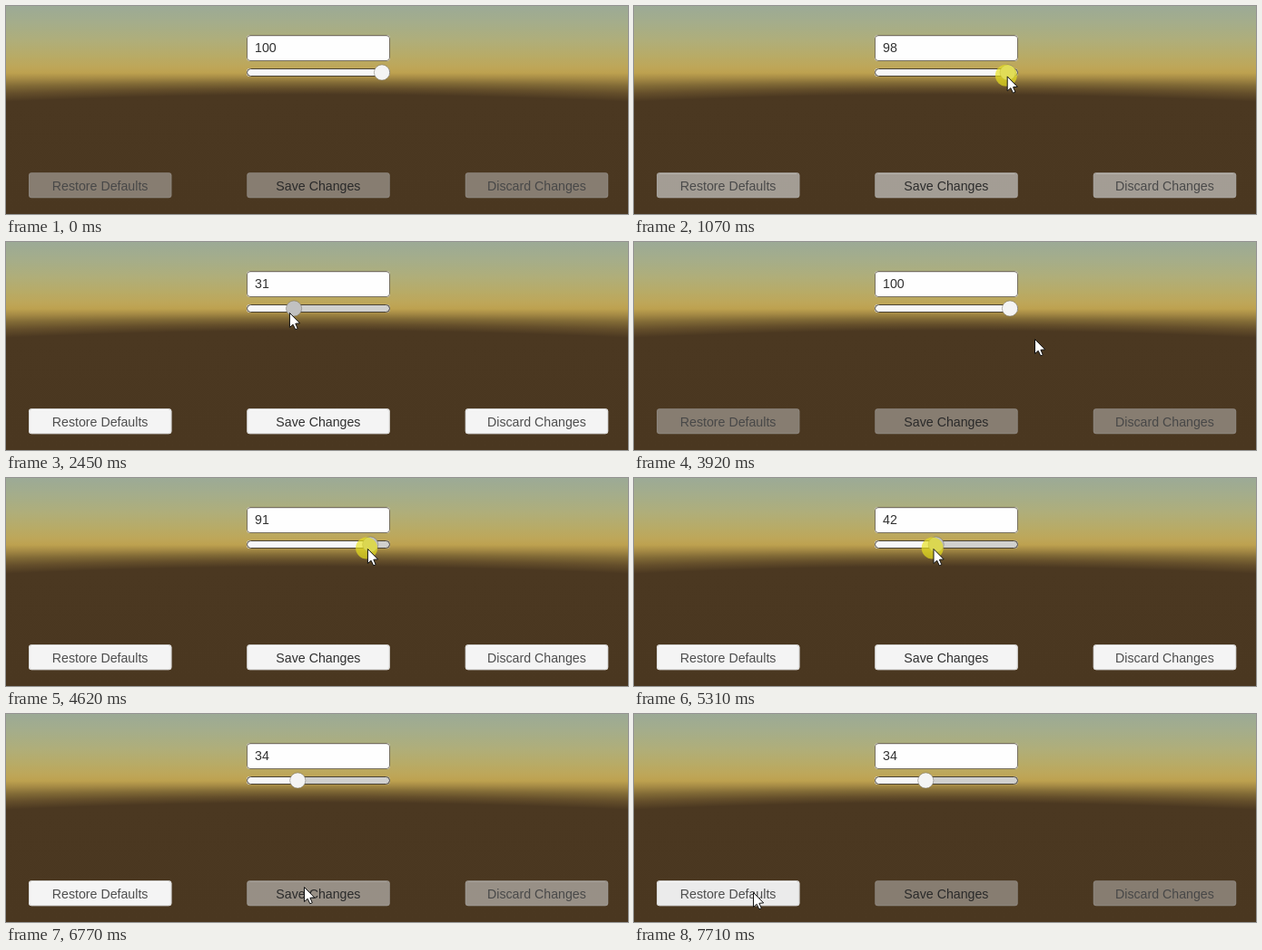
Animation, 685 px wide and 230 px high, one loop 8000 ms. Source, as an HTML page with a canvas:

```html
<!DOCTYPE html>
<html lang="en">
<head>
<meta charset="utf-8">
<title>Settings slider</title>
<style>
html, body { margin: 0; width: 100%; height: 100%; overflow: hidden; background: #4b3822; }
canvas { display: block; }
</style>
</head>
<body>
<canvas id="stage" width="685" height="230"></canvas>
<script>
const W = 685, H = 230, LOOP = 8000;
const ctx = document.getElementById('stage').getContext('2d');
const FONT = '14.2px "Liberation Sans", Arial, sans-serif';

const linear = p => p;
const easeOut = p => 1 - (1 - p) ** 3;
const easeInOut = p => p * p * (3 - 2 * p);
const mix = (a, b, p) => a + (b - a) * p;
const between = (t, a, b) => t >= a && t < b;

// Each move: start, end, from, to, easing, vertical bend.
const MOVES = [
  [250, 670, [564, 226], [401, 77], easeOut],
  [830, 900, [401, 77], [414, 77], linear],
  [1010, 1450, [414, 77], [390, 80], linear],
  [1450, 2400, [390, 80], [310, 77], linear],
  [2450, 2830, [310, 77], [554, 196], easeOut],
  [3540, 3920, [554, 196], [441, 107], easeOut],
  [4010, 4300, [441, 107], [410, 78], easeOut],
  [4410, 4620, [410, 78], [398, 78], linear],
  [4620, 5240, [398, 78], [335, 78], linear],
  [5240, 5820, [335, 78], [318, 78], easeOut],
  [5840, 6390, [318, 78], [328, 191], easeOut],
  [7100, 7710, [328, 191], [131, 197], easeInOut, -8]
];

// Same shape as MOVES, with the slider value instead of a point.
const VALUES = [
  [1010, 1450, 100, 88, linear],
  [1450, 2400, 88, 31, linear],
  [3450, 3451, 31, 100, linear],
  [4410, 4620, 100, 91, linear],
  [4620, 5240, 91, 46, linear],
  [5240, 5820, 46, 34, easeOut]
];

const DRAGS = [[1040, 2420], [4440, 5840]];
const CLICKS = [[3380, 3450], [6620, 6690]];
const inAny = (t, spans) => spans.some(([a, b]) => between(t, a, b));

const BUTTONS = [
  { x: 25, label: 'Restore Defaults', ink: 78, on: [[1040, 3450], [4440, LOOP]] },
  { x: 265.3, label: 'Save Changes', ink: 48, on: [[1040, 3450], [4440, 6690]] },
  { x: 505.8, label: 'Discard Changes', ink: 78, on: [[1040, 3450], [4440, 6690]] }
];

function current(list, t) {
  let found = list[0];
  for (const item of list) if (t >= item[0]) found = item;
  const p = Math.min(1, Math.max(0, (t - found[0]) / (found[1] - found[0])));
  return [found, found[4](p), p];
}

function pointer(t) {
  const [[, , a, b, , bend = 0], e, p] = current(MOVES, t);
  return [mix(a[0], b[0], e), mix(a[1], b[1], e) + bend * Math.sin(Math.PI * p)];
}

function sliderValue(t) {
  const [[, , a, b], e] = current(VALUES, t);
  return mix(a, b, e);
}

// Strength from 0 to 1 with a short fade at both ends of each span.
function fade(t, spans, time = 100) {
  return Math.max(...spans.map(([a, b]) => {
    const rise = Math.min(1, Math.max(0, (t - a) / time));
    const fall = b >= LOOP ? 0 : Math.min(1, Math.max(0, (t - b) / time));
    return rise - fall;
  }));
}

const grey = (v, alpha = 1) => `rgba(${v},${v},${v},${alpha})`;

function makeBackdrop() {
  const layer = document.createElement('canvas');
  layer.width = W;
  layer.height = H;
  const c = layer.getContext('2d');
  const stops = [
    [0, '#9caa96'], [18, '#a4ad8b'], [38, '#afae7a'], [55, '#b8ab67'],
    [68, '#bea658'], [74, '#bda14f'], [79, '#a58a45'], [85, '#816a36'],
    [91, '#654f2b'], [98, '#4b3821']
  ];
  for (let x = 0; x < W; x++) {
    const sag = 8 * ((x - W / 2) / (W / 2)) ** 2;
    const g = c.createLinearGradient(0, 0, 0, H);
    for (const [y, color] of stops) {
      const drop = sag * Math.max(0, (y - 74) / 24);
      g.addColorStop((y + drop) / H, color);
    }
    g.addColorStop(1, '#4a3720');
    c.fillStyle = g;
    c.fillRect(x, 0, 1, H);
  }
  return layer;
}

function box(x, y, w, h, r) {
  ctx.beginPath();
  ctx.roundRect(x, y, w, h, r);
}

function text(label, x, y, color, align) {
  ctx.font = FONT;
  ctx.textAlign = align;
  ctx.fillStyle = color;
  ctx.fillText(label, x, y);
}

function drawField(value) {
  box(265, 32, 158, 29, 4);
  ctx.fillStyle = '#fefefe';
  ctx.fill();
  box(265.5, 32.5, 157, 28, 3.5);
  ctx.strokeStyle = '#77705f';
  ctx.lineWidth = 1;
  ctx.stroke();
  ctx.fillStyle = 'rgba(0,0,0,.12)';
  ctx.fillRect(267, 33, 154, 1);
  text(String(Math.round(value)), 274, 51, '#323232', 'left');
}

function drawSlider(value, pressed) {
  const x = 273.5 + value * 1.405;
  box(265, 69, 158, 9, 4);
  ctx.fillStyle = '#d0d0ce';
  ctx.fill();
  ctx.save();
  ctx.clip();
  ctx.fillStyle = '#f7f7f7';
  ctx.fillRect(265, 69, x - 265, 9);
  ctx.restore();
  box(265.5, 69.5, 157, 8, 4);
  ctx.strokeStyle = '#4a4234';
  ctx.lineWidth = 1;
  ctx.stroke();

  ctx.beginPath();
  ctx.arc(x, 73.5, 8.6, 0, 2 * Math.PI);
  ctx.fillStyle = grey(mix(244, 192, pressed));
  ctx.fill();
  ctx.strokeStyle = 'rgba(110,105,95,.6)';
  ctx.lineWidth = 0.8;
  ctx.stroke();
}

function drawButton({ x, label, ink, on }, t, [px, py]) {
  const active = fade(t, on);
  const hover = px >= x && px <= x + 157 && py >= 184 && py <= 212;
  const pressed = hover && inAny(t, CLICKS);
  const shade = pressed ? 200 : hover ? 235 : 244;
  box(x, 184.2, 157.4, 28, 3);
  ctx.fillStyle = grey(mix(200, shade, active), mix(0.48, 1, active));
  ctx.fill();
  box(x + 0.5, 184.7, 156.4, 27, 3);
  ctx.strokeStyle = grey(mix(150, 205, active), mix(0.3, 0.7, active));
  ctx.lineWidth = 1;
  ctx.stroke();
  ctx.fillStyle = grey(255, active * 0.7);
  ctx.fillRect(x + 3, 185, 151, 1);
  text(label, x + 78.6, 203.5, grey(mix(ink - 6, ink, active)), 'center');
}

function drawPointer([x, y], down) {
  if (down) {
    ctx.beginPath();
    ctx.arc(x - 0.8, y - 0.6, 12, 0, 2 * Math.PI);
    ctx.fillStyle = 'rgba(232,226,28,.68)';
    ctx.fill();
  }
  const outline = [[0, 0], [0, 16], [3.7, 12.8], [6.3, 18.3], [8.8, 17.2], [6.4, 11.8], [11.2, 11.4]];
  ctx.beginPath();
  for (const [dx, dy] of outline) ctx.lineTo(x + dx + 0.5, y + dy + 0.5);
  ctx.closePath();
  ctx.fillStyle = '#fff';
  ctx.fill();
  ctx.strokeStyle = '#111';
  ctx.lineWidth = 1;
  ctx.stroke();
}

const backdrop = makeBackdrop();

function draw(t) {
  const value = sliderValue(t);
  const tip = pointer(t);
  ctx.drawImage(backdrop, 0, 0);
  drawField(value);
  drawSlider(value, fade(t, [[1010, 2450], [4410, 5990]]));
  for (const button of BUTTONS) drawButton(button, t, tip);
  if (t >= 290) drawPointer(tip, inAny(t, DRAGS) || inAny(t, CLICKS));
}

const start = performance.now();
function tick() {
  draw((performance.now() - start) % LOOP);
  requestAnimationFrame(tick);
}
tick();
</script>
</body>
</html>
```
